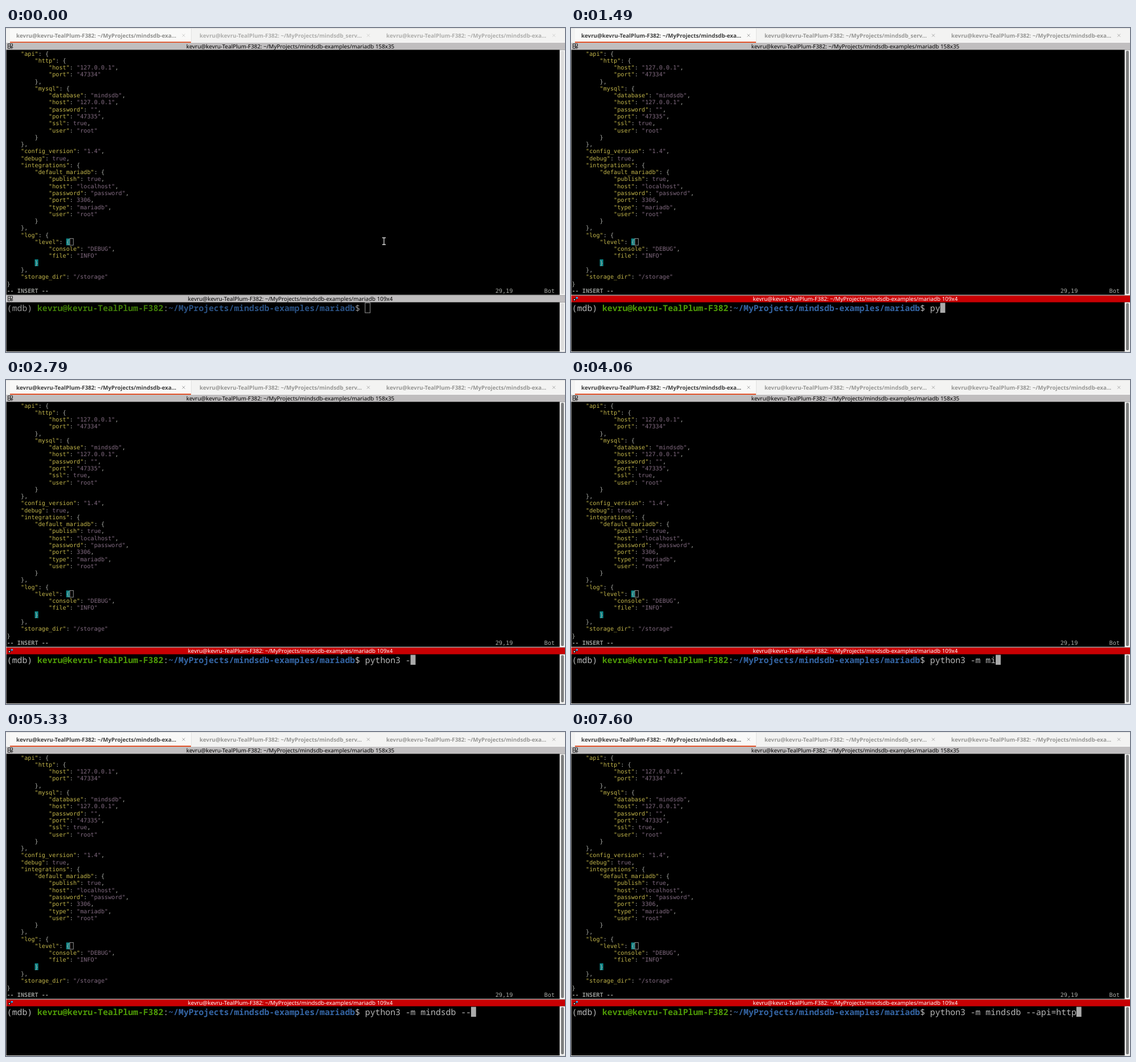
An HTML page for the animation above (8 s loop, 982x570 px).

```html
<!DOCTYPE html>
<html lang="en">
<head>
<meta charset="utf-8">
<title>Terminal</title>
<style>
  html, body { margin: 0; width: 100%; height: 100%; overflow: hidden; background: #000; }
  svg { display: block; width: 982px; height: 570px; text-rendering: geometricPrecision; }
  text { white-space: pre; }
  .code { font-family: "DejaVu Sans Mono", "Noto Sans Mono", monospace; }
  .mono { font-family: "Noto Sans Mono", "DejaVu Sans Mono", monospace; }
  .sans { font-family: "Noto Sans", "Open Sans", sans-serif; }
  .bold { font-weight: 700; }
</style>
</head>
<body>
<svg id="stage" viewBox="0 0 982 570"></svg>
<script>
const LOOP = 8000;
const stage = document.getElementById('stage');

function add(tag, attrs, text) {
  const node = document.createElementNS('http://www.w3.org/2000/svg', tag);
  set(node, attrs);
  if (text !== undefined) node.textContent = text;
  stage.appendChild(node);
  return node;
}
function set(node, attrs) {
  for (const key in attrs) node.setAttribute(key, attrs[key]);
}
const rect = (x, y, width, height, fill, more) => add('rect', { x, y, width, height, fill, ...more });
const label = (x, y, size, fill, text, cls, more) =>
  add('text', { x, y, 'font-size': size, fill, class: cls, ...more }, text);

const user = 'kevru';
const login = user + '@' + user + '-TealPlum-F382';
const folder = '~/MyProjects/mindsdb-examples/mariadb';

// Tab bar
rect(0, 0, 982, 26, '#f3f3f2');
rect(0, 0, 982, 1, '#dededd');
rect(7, 1, 318, 25, '#f9f9f8');
rect(325, 1, 1, 23, '#e2e2e1');
const underline = rect(7, 24, 318, 2, '#e0603a');
const tabs = [[18, 312, 'exa'], [340, 636.5, 'serv'], [668, 962.5, 'exa']].map(([x, closeX, end], i) => {
  const name = `${login}: ~/MyProjects/mindsdb${i === 1 ? '_' : '-'}${end}...`;
  return {
    text: label(x, 16.6, 9.75, '#999', name, 'sans bold'),
    cross: add('path', { d: `M${closeX - 2.5} 10.5l5 5m0-5l-5 5`, 'stroke-width': 1 })
  };
});

// Pane title bars
function paneBar(y, bottom, size) {
  return {
    back: rect(0, y, 982, bottom - y, '#c0bebf'),
    text: label(499.5, bottom - 2.7, 9.83, '#000', `${login}: ${folder} ${size}`, 'sans', { 'text-anchor': 'middle' }),
    icon: add('path', {
      d: `M3.5 ${bottom - 10.5}h8v4h-8zM3.5 ${bottom - 6.5}v4h4v-8M7.5 ${bottom - 4}h5m-2.5-2.5v5`,
      fill: 'none', stroke: '#222', 'stroke-width': 1
    })
  };
}
paneBar(26, 38.4, '158x35');
const lowerBar = paneBar(470.5, 482.5, '109x4');
const activeIcon = add('g', {});
[[4, 476, 4, 4, '#111'], [5, 477, 2, 2, '#eee'], [8, 473, 4, 4, '#163e5c'], [9, 473, 3, 3, '#4ba0d8']]
  .forEach(box => activeIcon.appendChild(rect(...box)));

// Scrollbars and window edges
rect(972.6, 38.4, 9.4, 431.6, '#f1f1f0');
rect(972.6, 482.5, 9.4, 87.5, '#f1f1f0');
const thumbs = [[40, 428], [484, 83]].map(([y, h]) => rect(975, y, 5, h, '#dcdcdb', { rx: 2 }));
rect(0, 469.5, 982, 1, '#f1f1f0');
rect(0, 569, 982, 1, '#d8d8d7');
rect(0, 26, .6, 544, '#e4e4e3');

// Editor pane
const CELL = 6.13, ROW = 12.27, SMALL = 10.18;
const colX = col => 1.5 + col * CELL;
const rowY = row => 48.6 + row * ROW;
const plain = '#a8aaa5', keyColor = '#c2b54a', valueColor = '#826b81';
const config = `    "api": {
        "http": {
            "host": "127.0.0.1",
            "port": "47334"
        },
        "mysql": {
            "database": "mindsdb",
            "host": "127.0.0.1",
            "password": "",
            "port": "47335",
            "ssl": true,
            "user": "root"
        }
    },
    "config_version": "1.4",
    "debug": true,
    "integrations": {
        "default_mariadb": {
            "publish": true,
            "host": "localhost",
            "password": "password",
            "port": 3306,
            "type": "mariadb",
            "user": "root"
        }
    },
    "log": {
        "level": {
            "console": "DEBUG",
            "file": "INFO"
        }
    },
    "storage_dir": "/storage"
}`;
rect(colX(17), 370.3, CELL, 12, '#0b8688');
rect(colX(8), 407, CELL, 12, '#0b8688');
config.split('\n').forEach((line, row) => {
  for (const token of line.matchAll(/"[^"]*"|\w+|[^\s"\w]+/g)) {
    const after = line[token.index + token[0].length];
    const color = /^["\w]/.test(token[0]) ? (after === ':' ? keyColor : valueColor) : plain;
    label(colX(token.index), rowY(row), SMALL, color, token[0], 'code');
  }
});
rect(colX(18) + .3, 370.3, CELL, 11.8, 'none', { stroke: '#b4b4b4', 'stroke-width': .8 });
label(colX(0), rowY(34), SMALL, '#969894', '-- INSERT --', 'code bold');
label(colX(140), rowY(34), SMALL, plain, '29,19', 'code');
label(colX(154), rowY(34), SMALL, plain, 'Bot', 'code');

// Shell pane
const WIDE = 8.86, BIG = 14.77;
const shellX = col => 1.8 + col * WIDE;
const command = 'python3 -m mindsdb --api=http';
const start = 71;
const shellText = (col, text, cls = 'mono') => label(shellX(col), 498, BIG, '#b8b8b8', text, cls);
const pathCol = 6 + login.length + 1;
const greys = [shellText(0, '(mdb)'), shellText(pathCol - 1, ':'), shellText(pathCol + folder.length, '$')];
const host = shellText(6, login, 'mono bold');
const path = shellText(pathCol, folder, 'mono bold');
const typed = shellText(start, '');
const cursor = rect(0, 483.5, WIDE, 17.5, '#aaa', { 'stroke-width': .9 });

const pointer = add('path', {
  d: 'M-3-6h2q1 0 1 1q0-1 1-1h2M0-5v10M-3 6h2q1 0 1-1q0 1 1 1h2',
  fill: 'none', stroke: '#d8d8d8', 'stroke-width': 1.3
});

// One time per typed character
const keyTimes = [1290, 1490, 1680, 1770, 1870, 2200, 2390, 2560, 2790, 3370, 3850, 3850, 4060,
  4230, 4320, 4520, 4630, 4820, 5050, 5110, 5330, 5900, 6020, 6210, 6810, 7100, 7180, 7400, 7600];
const moves = [[0, 664, 375], [230, 663, 388], [320, 661, 420], [420, 659, 458], [510, 657, 490], [600, 657, 503]];

function draw(t) {
  const paneActive = t >= 510, windowActive = t >= 750;

  tabs.forEach(({ text, cross }, i) => {
    const color = windowActive ? (i ? '#969694' : '#3d3d3d') : (i ? '#aeaeac' : '#8f8f8d');
    set(text, { fill: color });
    set(cross, { stroke: windowActive ? '#aaa' : '#d2d2d0' });
  });
  set(underline, { fill: windowActive ? '#e2532a' : '#e0603a' });
  const thumbColor = t >= 910 ? '#7d7e7e' : windowActive ? '#a4a5a5' : '#dcdcdb';
  thumbs.forEach(thumb => set(thumb, { fill: thumbColor }));

  set(lowerBar.back, { fill: paneActive ? '#c80003' : '#c0bebf' });
  set(lowerBar.text, { fill: paneActive ? '#fff' : '#000' });
  set(lowerBar.icon, { visibility: paneActive ? 'hidden' : 'visible' });
  set(activeIcon, { visibility: paneActive ? 'visible' : 'hidden' });

  greys.forEach(node => set(node, { fill: paneActive ? '#b8b8b8' : '#969696' }));
  set(host, { fill: paneActive ? '#4e9a06' : '#3e7b07' });
  set(path, { fill: paneActive ? '#3465a4' : '#2a5183' });

  const count = keyTimes.filter(time => time <= t).length;
  typed.textContent = command.slice(0, count);
  set(cursor, {
    x: shellX(start + count),
    fill: paneActive ? '#aaa' : 'none',
    stroke: paneActive ? 'none' : '#aaa'
  });

  const [, x, y] = moves.filter(move => move[0] <= t).pop();
  set(pointer, { transform: `translate(${x} ${y})`, visibility: t < 1240 ? 'visible' : 'hidden' });
}

const begin = performance.now();
function tick() {
  draw((performance.now() - begin) % LOOP);
  requestAnimationFrame(tick);
}
draw(0);
requestAnimationFrame(tick);
</script>
</body>
</html>
```
